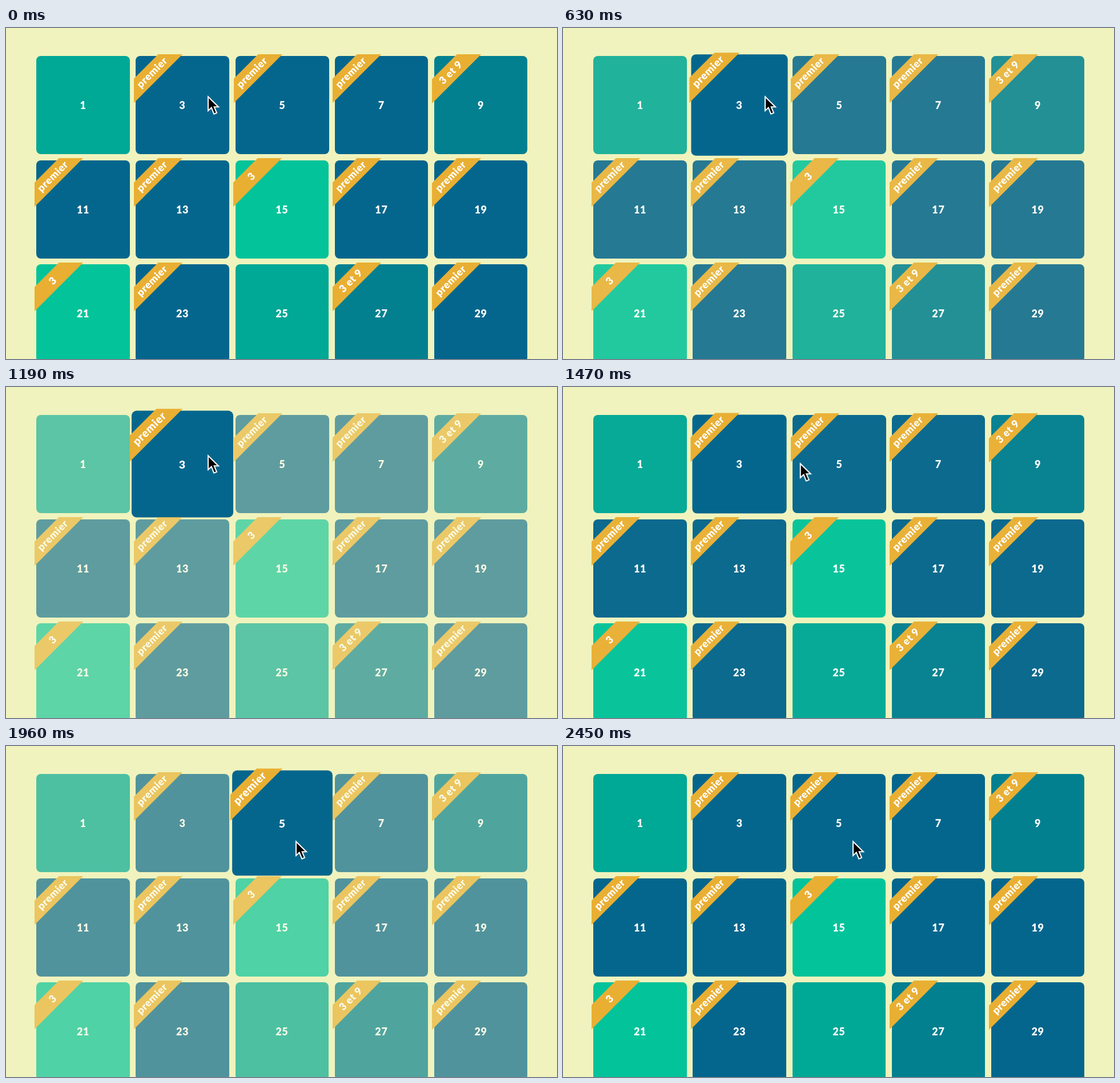
An HTML page for the animation above (2.52 s loop, 965 by 580 pixels).

```html
<!DOCTYPE html>
<html lang="fr">
<head>
<meta charset="utf-8">
<title>Nombres impairs</title>
<style>
  html, body { margin: 0; width: 100%; height: 100%; overflow: hidden; }
  body {
    --t: 0ms;
    position: relative;
    background: #f0f3bd;
    color: #fff;
    font: 900 18px/30px Lato, "Open Sans", sans-serif;
    letter-spacing: .6px;
  }
  .tile {
    position: absolute;
    width: 163.5px;
    height: 172px;
    border-radius: 8px;
    line-height: 172px;
    text-align: center;
    animation: 500ms paused;
    animation-name: fade, fade, fade;
    animation-delay: calc(279ms - var(--t)), calc(1049ms - var(--t)), calc(1853ms - var(--t));
  }
  .n3 { animation-name: grow, grow, fade; }
  .n5 { animation-name: fade, fade, grow; }
  .plain { background: #00a896; }
  .prime { background: #05668d; }
  .three { background: #02c39a; }
  .nine { background: #028090; }

  .corner {
    position: absolute;
    left: -3.5px;
    top: -3.5px;
    width: 86px;
    height: 86px;
    overflow: hidden;
  }
  .band {
    position: absolute;
    left: -32.75px;
    top: 17.05px;
    width: 130px;
    height: 30.4px;
    line-height: 29.5px;
    background: #e9af33;
    transform: rotate(-45deg);
  }

  #cursor {
    position: absolute;
    left: 0;
    top: 0;
    overflow: visible;
    animation: move 350ms calc(1320ms - var(--t)) paused both;
  }

  @keyframes grow { 50% { transform: scale(1.1); } }
  @keyframes fade { 50% { opacity: .55; } }
  @keyframes move {
    0% { transform: translate(353px, 118px); animation-timing-function: ease-in; }
    43% { transform: translate(415px, 132px); animation-timing-function: ease-out; }
    100% { transform: translate(507px, 165px); }
  }
</style>
</head>
<body>
<svg id="cursor" width="24" height="36">
  <path d="M1 2.5V27L6.8 21.6L11.2 32.6L16 30.6L11.6 20.2H19Z"
        fill="#000" stroke="#fff" stroke-width="2"/>
</svg>
<script>
  const LOOP = 2520, STEP = 70;
  const cursor = document.getElementById('cursor');
  const labels = { prime: 'premier', three: '3', nine: '3 et 9' };

  function isPrime(n) {
    for (let d = 2; d * d <= n; d++) if (n % d === 0) return false;
    return n > 1;
  }

  function kindOf(n) {
    if (isPrime(n)) return 'prime';
    if (n % 9 === 0) return 'nine';
    return n % 3 === 0 ? 'three' : 'plain';
  }

  function addTile(i) {
    const n = 2 * i + 1, kind = kindOf(n);
    const tile = document.createElement('div');
    tile.className = `tile ${kind} n${n}`;
    tile.style.left = 53.2 + (i % 5) * 174.15 + 'px';
    tile.style.top = 49 + Math.floor(i / 5) * 182.6 + 'px';
    tile.textContent = n;
    if (labels[kind]) {
      tile.insertAdjacentHTML('beforeend',
        `<div class="corner"><div class="band">${labels[kind]}</div></div>`);
    }
    document.body.insertBefore(tile, cursor);
  }

  for (let i = 0; i < 15; i++) addTile(i);

  // The paused CSS animations are advanced in even steps through --t.
  const start = performance.now();
  function tick() {
    const t = (performance.now() - start) % LOOP;
    document.body.style.setProperty('--t', Math.floor(t / STEP) * STEP + 'ms');
    requestAnimationFrame(tick);
  }
  tick();
</script>
</body>
</html>
```
